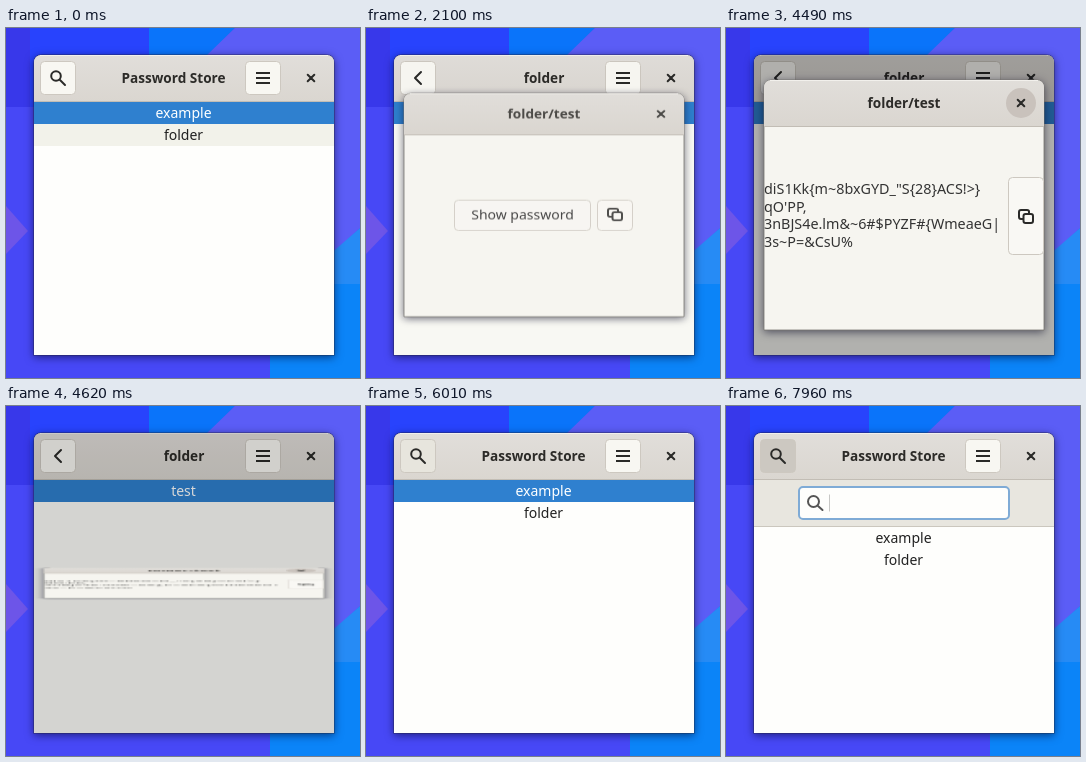
An HTML page for the animation above (7.99 s loop, 354 by 350 pixels).

```html
<!DOCTYPE html>
<html lang="en">
<head>
<meta charset="utf-8">
<title>Password Store</title>
<style>
  html, body { margin: 0; width: 100%; height: 100%; overflow: hidden; background: #4748f6; }
  svg { display: block; width: 354px; height: 350px; }
  text { font: 14px "Noto Sans", "Open Sans", sans-serif; fill: #222; text-anchor: middle; }
  .title { font-weight: 700; font-size: 13.6px; fill: #2c2b28; }
  .button { fill: #f8f7f2; stroke: #cdc8c0; }
  .line { fill: none; stroke: #2a2a28; stroke-width: 2; stroke-linecap: round; stroke-linejoin: round; }
  .window { filter: drop-shadow(0 2px 4px rgba(0, 0, 30, .55)); }
  .secret text { text-anchor: start; font-size: 14.35px; fill: #333; white-space: pre; }

  /* One shared 7990 ms loop */
  .anim { animation: 7990ms linear infinite; }
  .step { animation-timing-function: step-end; }

  .home { animation-name: home; }
  .folder { animation-name: folder; }
  @keyframes home { 0% { opacity: 1 } 6.63% { opacity: 0 } 66.7%, 100% { opacity: 1 } }
  @keyframes folder { 0% { opacity: 0 } 6.63% { opacity: 1 } 66.7%, 100% { opacity: 0 } }

  .hover-row { animation-name: hover-row; }
  @keyframes hover-row { 0% { fill: #f2f2ea } 5.63% { fill: #dfdfd8 } 6.63%, 100% { fill: #fefefc } }
  .selection { animation-name: selection; }
  @keyframes selection { 0% { opacity: 1 } 75.7%, 100% { opacity: 0 } }
  .selected-text { animation-name: selected-text; }
  @keyframes selected-text { 0% { fill: #fff } 75.7%, 100% { fill: #222 } }

  .corner { animation-name: corner; }
  @keyframes corner {
    0%, 61.58% { fill: #f8f7f2 }
    62.58%, 65.8% { fill: #e9e7df }
    65.9%, 66.7% { fill: #ccc8c1 }
    67.46%, 75.2% { fill: #e9e7df }
    75.8%, 99.99% { fill: #ccc8c1 }
    100% { fill: #f8f7f2 }
  }
  .reveal { animation-name: reveal; }
  @keyframes reveal {
    0%, 75.6% { transform: translateY(-47px); animation-timing-function: cubic-bezier(.22, .61, .36, 1) }
    78.7%, 100% { transform: none }
  }
  .caret { animation-name: caret; }
  @keyframes caret {
    0%, 78.5% { opacity: 0 }
    78.7%, 81.6% { opacity: 1 }
    85.61%, 88% { opacity: 0 }
    92.8%, 96.62% { opacity: 1 }
    100% { opacity: .16 }
  }

  .backdrop { animation-name: backdrop; }
  @keyframes backdrop { 0%, 25.03% { fill: #fefefc } 26%, 56.4% { fill: #fafaf5 } 59.45%, 100% { fill: #fefefc } }
  .dim { animation-name: dim; }
  @keyframes dim { 0%, 26.2% { opacity: 0 } 32.3%, 56.4% { opacity: .29 } 59.45%, 100% { opacity: 0 } }

  .dialog { transform-origin: 178px 177px; animation-name: dialog; }
  @keyframes dialog {
    0%, 25.03% { transform: scaleY(0); animation-timing-function: cubic-bezier(.33, .67, .67, 1) }
    26.91% { transform: none }
    56.6% { transform: none; animation-timing-function: cubic-bezier(.33, .67, .67, 1) }
    58.5%, 100% { transform: scaleY(0) }
  }
  .dialog-shown { animation-name: dialog-shown; }
  @keyframes dialog-shown { 0% { opacity: 0 } 25.03% { opacity: 1 } 58.5%, 100% { opacity: 0 } }
  .focus { animation-name: focus; }
  @keyframes focus { 0%, 26.3% { opacity: .82 } 28.8%, 100% { opacity: 1 } }

  .ask { animation-name: ask; }
  .secret { animation-name: secret; }
  @keyframes ask { 0% { opacity: 1 } 38.05%, 100% { opacity: 0 } }
  @keyframes secret { 0% { opacity: 0 } 38.05%, 100% { opacity: 1 } }
  .show { animation-name: show; }
  @keyframes show { 0%, 29.5% { fill: #f7f6f2 } 32%, 36.7% { fill: #e6e4df } 36.8%, 100% { fill: #d0ccc6 } }
  .copy { animation-name: copy; }
  @keyframes copy { 0%, 45.31% { fill: #f9f8f4 } 47.8%, 48.7% { fill: #e6e4df } 51.19%, 100% { fill: #f9f8f4 } }
  .close { animation-name: close; }
  @keyframes close { 0%, 53.19% { opacity: 0 } 55.69%, 100% { opacity: 1 } }
</style>
</head>
<body>
<svg viewBox="0 0 354 350">
  <defs>
    <linearGradient id="bar" x2="0" y2="1">
      <stop stop-color="#e1deda"/><stop offset="1" stop-color="#dad6d0"/>
    </linearGradient>
    <clipPath id="content"><path d="M28 74h300v253H28z"/></clipPath>
    <path id="frame" d="M28 327V35q0-8 8-8h284q8 0 8 8v292z"/>
    <path id="cross" class="line" d="M-3.3-3.3 3.3 3.3M3.3-3.3-3.3 3.3"/>
    <g id="copy-icon" class="line">
      <path d="M-3.500 3H-5Q-7 3-7 1V-4Q-7-6-5-6H1Q3-6 3-4.500V-3"/>
      <rect x="-2.500" y="-2" width="9.500" height="9" rx="2"/>
    </g>
  </defs>

  <!-- Wallpaper -->
  <path fill="#4748f6" d="M0 0h354v350H0z"/>
  <path fill="#3838ea" d="M0 0h24v79H0z"/>
  <path fill="#2843fd" d="M24 0h120v79H24z"/>
  <path fill="#0a74fa" d="M143 0h86l-30 30h-56z"/>
  <path fill="#5b5df6" d="M229 0h125v200l-30 28V27H201z"/>
  <path fill="#6d55e8" d="M0 178 22 203 0 226z"/>
  <path fill="#0b84f8" d="M264 320 322 254h32v96h-90z"/>
  <path fill="#268bf5" d="M354 200v56h-32v-28z"/>

  <!-- Main window -->
  <g class="window"><use href="#frame" fill="#fefefc" stroke="#22223a" stroke-opacity=".45" stroke-width="1.500"/></g>
  <path class="anim backdrop" d="M28 74h300v253H28z"/>
  <path fill="url(#bar)" d="M28 74V35q0-8 8-8h284q8 0 8 8v39z"/>
  <path stroke="#f2f0ec" d="M34 27.500h288"/>
  <path stroke="#c2bdb5" d="M28 73.500h300"/>
  <rect class="button anim corner" x="34.500" y="33.500" width="35" height="33" rx="4"/>
  <rect class="button" x="239.500" y="33.500" width="35" height="33" rx="4"/>
  <path class="line" style="stroke-linecap:butt" d="M250 45h14M250 50h14M250 55h14"/>
  <use href="#cross" x="305" y="50"/>

  <g class="anim step home">
    <g class="line"><circle cx="50" cy="48" r="4.800"/><path d="m54 52 5 5"/></g>
    <text class="title" x="167.500" y="55">Password Store</text>
    <g clip-path="url(#content)">
      <g class="anim reveal">
        <path fill="#e8e6df" d="M28 74h300v47H28z"/>
        <path stroke="#cbc7be" d="M28 120.500h300"/>
        <rect x="73" y="81" width="210" height="32" rx="4" fill="#fefefc" stroke="#7fabd6" stroke-width="2"/>
        <g class="line" style="stroke:#555"><circle cx="87.500" cy="95.500" r="5.500"/><path d="m92 100 4.500 4"/></g>
        <path class="anim caret" stroke="#222" d="M103.500 88.500v17"/>
        <path class="anim step hover-row" d="M28 143h300v22H28z"/>
        <path class="anim step selection" fill="#2f80cf" d="M28 121h300v22H28z"/>
        <text class="anim step selected-text" x="177.500" y="137">example</text>
        <text x="177.500" y="159">folder</text>
      </g>
    </g>
  </g>

  <g class="anim step folder">
    <path class="line" d="m55 44-6 6 6 6"/>
    <text class="title" x="178" y="55">folder</text>
    <path fill="#2f80cf" d="M28 74h300v22H28z"/>
    <text x="177.500" y="90" style="fill:#fff">test</text>
  </g>
  <use href="#frame" class="anim dim"/>

  <!-- Attached dialog -->
  <g class="anim step dialog-shown">
    <g class="anim dialog">
      <path class="window" fill="#f6f5f0" stroke="#77756f" stroke-width=".8" d="M38 302V60q0-8 8-8h264q8 0 8 8v242z"/>
      <path fill="url(#bar)" d="M38 98V60q0-8 8-8h264q8 0 8 8v38z"/>
      <path stroke="#f2f0ec" d="M44 52.500h268"/>
      <path stroke="#c2bdb5" d="M38 98.500h280"/>
      <circle class="anim close" cx="295" cy="75" r="15" fill="#c9c2bc"/>
      <g class="anim focus">
        <text class="title" x="178" y="80">folder/test</text>
        <use href="#cross" x="295" y="75"/>
        <g class="anim step ask">
          <rect class="button anim show" x="88.500" y="171.500" width="136" height="34" rx="4"/>
          <text x="156.500" y="193">Show password</text>
          <rect class="button" x="231.500" y="171.500" width="35" height="34" rx="4"/>
          <use href="#copy-icon" x="249" y="187"/>
        </g>
        <g class="anim step secret">
          <text x="38" y="166">diS1Kk{m~8bxGYD_"S{28}ACS!&gt;}</text>
          <text x="38" y="184">qO'PP,</text>
          <text x="38" y="201">3nBJS4e.lm&amp;~6#$PYZF#{WmeaeG|</text>
          <text x="38" y="219">3s~P=&amp;CsU%</text>
          <rect class="button anim copy" x="282.500" y="149.500" width="35" height="77" rx="4"/>
          <use href="#copy-icon" x="300" y="188"/>
        </g>
      </g>
    </g>
  </g>
</svg>
</body>
</html>
```
